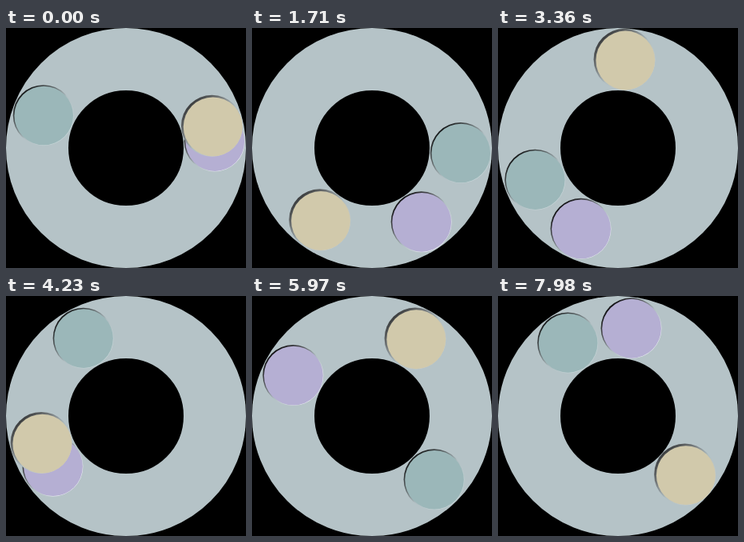
An HTML page that plays this animation: 300 by 300 pixels, repeating every 8000 ms.

```html
<!DOCTYPE html>
<html lang="en">
<head>
<meta charset="utf-8">
<title>Orbiting discs</title>
<style>
  html, body { margin: 0; width: 100%; height: 100%; overflow: hidden; background: #000; }
  svg { display: block; width: 100vw; height: 100vh; }
</style>
</head>
<body>
<svg viewBox="0 0 300 300">
  <defs></defs>
  <circle cx="150" cy="150" r="111" fill="none" stroke="#b5c3c7" stroke-width="78"/>
</svg>
<script>
const LOOP = 8000, STEP = 30;
const svg = document.querySelector('svg');
const defs = svg.querySelector('defs');

// Angles in degrees clockwise from the right, speeds in degrees per second.
const discs = [
  { face: '#9bb7b9', dark: '#17191a', mid: '#5c6466', light: '#c6d6d8', start: 201.6, speed: 94.48, shift: 0.4, rim: 38, r: 36.8 },
  { face: '#b5afd3', dark: '#121214', mid: '#55575c', light: '#f0f0f8', start: -4.4, speed: 35.46, shift: 0.5, rim: 38, r: 36.9 },
  { face: '#d1c9ab', dark: '#3c3e3f', mid: '#777c7e', light: '#cfd0cb', start: -14.5, speed: -128.37, shift: 1.2, rim: 38.5, r: 36.9 }
];

function add(parent, tag, attrs) {
  const el = document.createElementNS('http://www.w3.org/2000/svg', tag);
  for (const key in attrs) el.setAttribute(key, attrs[key]);
  return parent.appendChild(el);
}

discs.forEach((d, i) => {
  const grad = add(defs, 'linearGradient', { id: 'rim' + i, x1: 0.15, y1: 0.15, x2: 0.85, y2: 0.85 });
  [[0, d.dark], [0.28, d.mid], [0.55, '#b0bec2'], [1, d.light]].forEach(([offset, color]) =>
    add(grad, 'stop', { offset, 'stop-color': color }));
  d.group = add(svg, 'g', {});
  add(d.group, 'circle', { r: d.rim, fill: `url(#rim${i})` });
  add(d.group, 'circle', { cx: d.shift, cy: d.shift, r: d.r, fill: d.face });
});

function draw(ms) {
  const t = Math.floor((ms % LOOP) / STEP) * STEP / 1000;
  for (const d of discs) {
    const a = (d.start + d.speed * t) * Math.PI / 180;
    const x = 150 + 111 * Math.cos(a), y = 150 + 111 * Math.sin(a);
    d.group.setAttribute('transform', `translate(${x.toFixed(2)} ${y.toFixed(2)})`);
  }
}

const begin = performance.now();
function tick() {
  draw(performance.now() - begin);
  requestAnimationFrame(tick);
}
tick();
</script>
</body>
</html>
```
